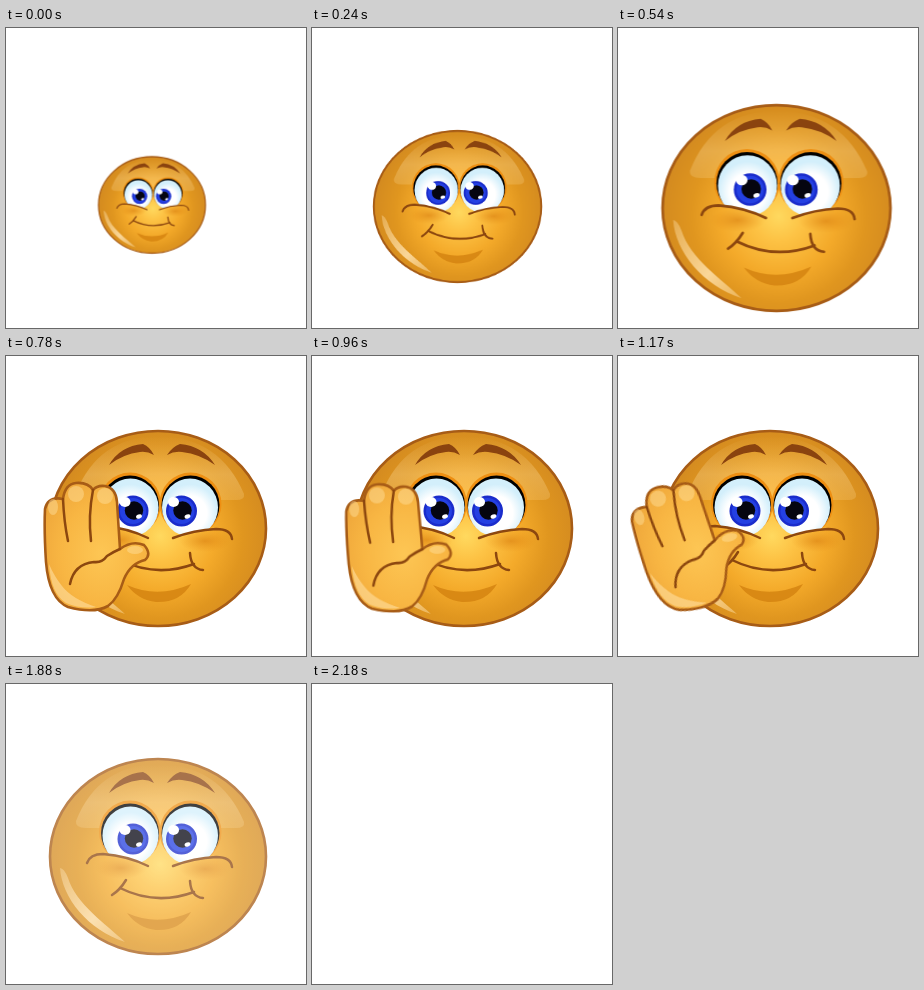
Recreate the animation shown at these times as an HTML page. Size 300x300 px, loop 2280 ms.

```html
<!DOCTYPE html>
<html lang="en">
<head>
<meta charset="utf-8">
<title>Waving smiley</title>
<style>
  html, body { margin: 0; width: 100%; height: 100%; overflow: hidden; background: #fff; }
  svg { display: block; width: 100vw; height: 100vh; }

  #scene, #head, #palm, #wave { animation: 2280ms step-end -1ms infinite; }
  #scene { animation-name: fade; }
  #head { animation-name: grow; transform-origin: 152px 172.5px; }
  #palm { animation-name: show; }
  #wave { animation-name: wave; transform-origin: 85px 250px; }

  /* Motion advances every 30 ms, so each segment is stepped. */
  @keyframes grow {
    0% { transform: translate(-6px, 4.5px) scale(.495); animation-timing-function: steps(8); }
    10.526% { transform: translate(-6.5px, 6px) scale(.775); animation-timing-function: steps(7); }
    19.737% { transform: translate(-8.5px, 7.5px) scale(1.05); animation-timing-function: steps(3); }
    23.684% { transform: translate(6.5px, 7.5px) scale(1.055); animation-timing-function: steps(2); }
    26.316% { transform: translate(18px, 7px) scale(1.055); animation-timing-function: steps(3); }
    30.263%, 100% { transform: translate(0, 0) scale(1); }
  }
  @keyframes show {
    0% { opacity: 0; }
    31.579% { opacity: 1; }
    60.526%, 100% { opacity: 0; }
  }
  @keyframes wave {
    0%, 31.579% { transform: translate(0, 0) rotate(-9deg); animation-timing-function: steps(2); }
    34.211% { transform: translate(0, 0) rotate(0deg); animation-timing-function: steps(3); }
    38.158% { transform: translate(0, 0) rotate(-9deg); animation-timing-function: steps(3); }
    42.105% { transform: translate(-2px, 1px) rotate(-1.6deg); animation-timing-function: steps(4); }
    47.368% { transform: translate(0, 0) rotate(0deg); animation-timing-function: steps(4); }
    52.632% { transform: translate(-2px, -4px) rotate(-20deg); animation-timing-function: steps(6); }
    60.526%, 100% { transform: translate(0, 0) rotate(0deg); }
  }
  @keyframes fade {
    0% { opacity: 1; }
    82.456% { opacity: .75; }
    86.842% { opacity: .5; }
    91.228% { opacity: .25; }
    95.614%, 100% { opacity: 0; }
  }

  .line { fill: none; stroke: #8c470f; stroke-width: 2.5; stroke-linecap: round; stroke-linejoin: round; }
  .edge { stroke: #a75c16; stroke-width: 2.6; stroke-linejoin: round; }
  .brow { fill: #8a430f; }
  .lid { fill: #ee8f12; }
  .tip { fill: #ffe3a0; opacity: .45; }
</style>
</head>
<body>
<svg viewBox="0 0 300 300">
  <defs>
    <radialGradient id="skin" gradientUnits="userSpaceOnUse" cx="154" cy="180" r="110">
      <stop offset="0" stop-color="#ffd95f"/>
      <stop offset=".22" stop-color="#fdc244"/>
      <stop offset=".5" stop-color="#f4aa2a"/>
      <stop offset=".75" stop-color="#e0961f"/>
      <stop offset="1" stop-color="#d48b20"/>
    </radialGradient>
    <linearGradient id="gloss" x1="0" y1="0" x2="0" y2="1">
      <stop offset="0" stop-color="#ffe3a8" stop-opacity="0"/>
      <stop offset=".6" stop-color="#ffe3a8" stop-opacity=".3"/>
      <stop offset="1" stop-color="#ffe3a8" stop-opacity=".2"/>
    </linearGradient>
    <linearGradient id="shine" x1="0" y1="0" x2="1" y2="1">
      <stop offset="0" stop-color="#ffe2ad" stop-opacity=".35"/>
      <stop offset=".6" stop-color="#ffe2ad" stop-opacity=".85"/>
      <stop offset="1" stop-color="#ffe2ad" stop-opacity=".4"/>
    </linearGradient>
    <radialGradient id="white" cy=".6">
      <stop offset=".6" stop-color="#fff"/>
      <stop offset="1" stop-color="#d3effb"/>
    </radialGradient>
    <radialGradient id="blush">
      <stop offset="0" stop-color="#d97f10" stop-opacity=".6"/>
      <stop offset="1" stop-color="#e38d18" stop-opacity="0"/>
    </radialGradient>
    <radialGradient id="hand" cx=".55" cy=".55" r=".65">
      <stop offset="0" stop-color="#fdc654"/>
      <stop offset=".6" stop-color="#f8b643"/>
      <stop offset="1" stop-color="#eea63a"/>
    </radialGradient>
    <clipPath id="sight">
      <path d="M70 100H240V174Q225 172 210 173Q188 174 167 182L154 190L142 182Q122 172 97 170L70 176Z"/>
    </clipPath>
    <g id="iris">
      <circle r="15.5" fill="#1a2ccb"/>
      <circle r="13" fill="#2440e2"/>
      <circle cx="1" cy="-.5" r="9.2" fill="#050510"/>
      <g fill="#fff">
        <ellipse cx="-8" cy="-9" rx="5.5" ry="5"/>
        <ellipse cx="6" cy="5.5" rx="3" ry="2" transform="rotate(-20 6 5.5)"/>
      </g>
    </g>
  </defs>

  <g id="scene">
    <g id="head">
      <ellipse class="edge" cx="152" cy="172.5" rx="108" ry="97.5" fill="url(#skin)"/>
      <path d="M70 137Q92 81 152 80Q214 81 238 138Q239 144 230 144H80Q69 144 70 137Z" fill="url(#gloss)"/>
      <path d="M54 184C56 214 82 246 119 258C100 240 70 220 62 194Q58 184 54 184Z" fill="url(#shine)"/>

      <ellipse cx="115" cy="184" rx="26" ry="11" fill="url(#blush)"/>
      <ellipse cx="199" cy="185" rx="26" ry="11" fill="url(#blush)"/>

      <g clip-path="url(#sight)">
        <ellipse class="lid" cx="124" cy="148" rx="31" ry="31.5"/>
        <ellipse class="lid" cx="184.5" cy="148" rx="31" ry="31.5"/>
        <ellipse cx="124" cy="149" rx="29" ry="29.5"/>
        <ellipse cx="184.5" cy="149" rx="29" ry="29.5"/>
        <ellipse cx="124.5" cy="151.5" rx="28" ry="29" fill="url(#white)"/>
        <ellipse cx="184" cy="151.5" rx="28" ry="29" fill="url(#white)"/>
        <use href="#iris" x="127" y="155"/>
        <use href="#iris" x="175.5" y="155"/>
      </g>

      <path class="brow" d="M103 109Q114 90 137 88Q144 91 148 99Q141 95 134 96Q117 98 103 109Z"/>
      <path class="brow" d="M209 109Q197 90 174 88Q166 91 161 99Q168 95 176 96Q194 98 209 109Z"/>

      <g class="line">
        <path d="M81 179Q84 170 97 170Q122 172 142 182"/>
        <path d="M167 182Q188 174 210 173Q225 173 226 183"/>
        <path d="M114 204Q150 222 188 208"/>
        <path d="M106 211Q114 206 120 196"/>
        <path d="M184 197Q185 213 197 214"/>
      </g>
      <path d="M121 229Q152 243 185 228Q174 247 150 246Q132 244 121 229Z" fill="#d4820f" opacity=".8"/>
    </g>

    <g id="palm">
      <g id="wave">
        <path class="edge" d="M40 206Q38 175 39 153Q42 140 57 143Q59 128 70 127Q82 126 87 134Q91 129 99 130Q110 132 111 146L114 193Q126 184 138 189Q146 198 139 204Q125 207 118 223Q112 243 102 250Q88 258 62 251Q43 243 40 206Z" fill="url(#hand)"/>
        <path d="M43 208Q45 238 60 247Q74 253 90 251Q66 243 56 230Q48 220 43 208Z" fill="#ffe0a0" opacity=".6"/>
        <ellipse class="tip" cx="47" cy="151" rx="5" ry="8"/>
        <ellipse class="tip" cx="70" cy="138" rx="8" ry="8"/>
        <ellipse class="tip" cx="99" cy="140" rx="8" ry="8"/>
        <ellipse class="tip" cx="129" cy="194" rx="8" ry="4"/>
        <g class="line">
          <path d="M57 143Q58 166 62 185"/>
          <path d="M87 134Q82 160 85 185"/>
          <path d="M64 228Q68 208 88 206Q96 207 101 200Q107 196 114 193"/>
        </g>
      </g>
    </g>
  </g>
</svg>
</body>
</html>
```
